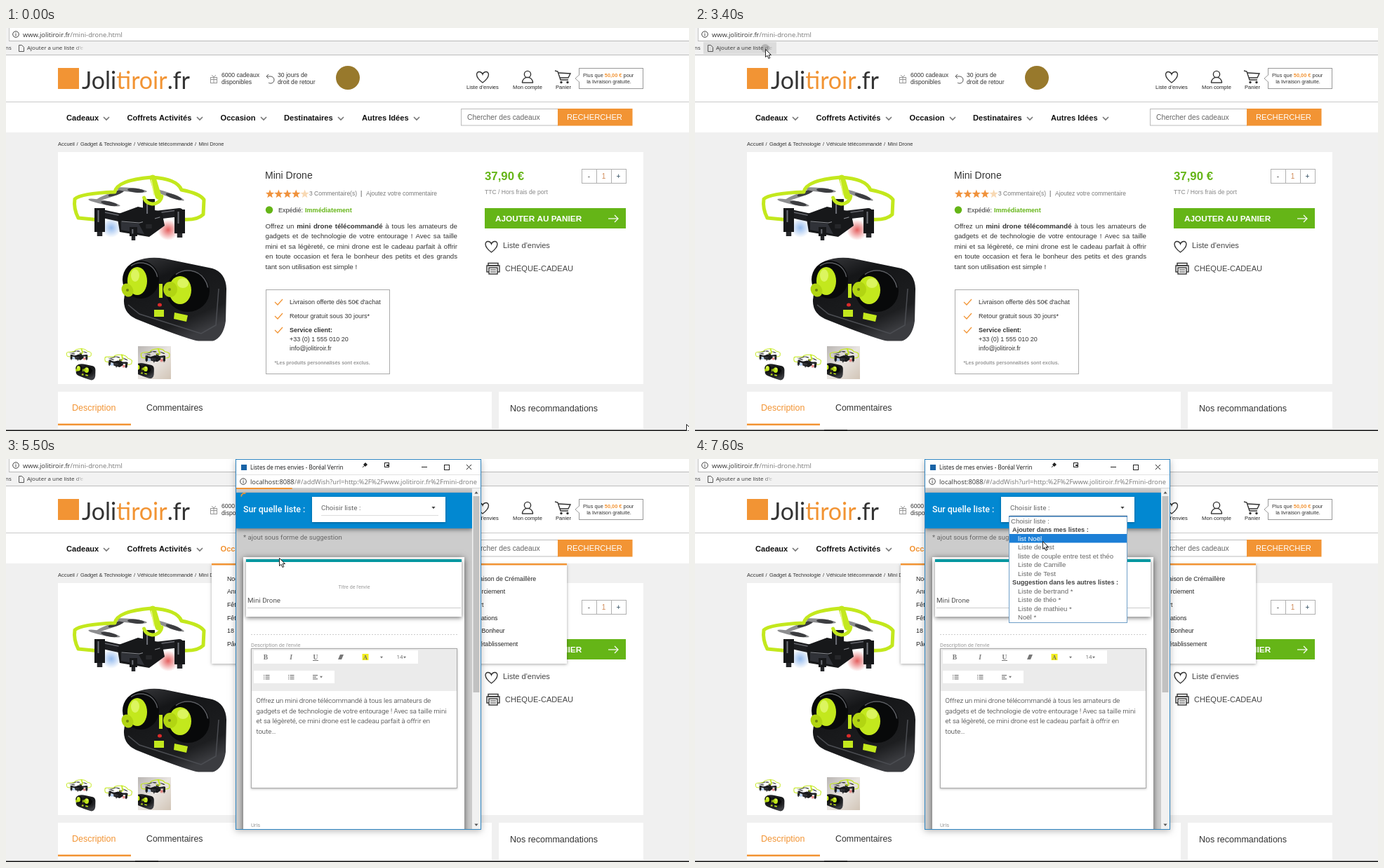
Recreate the animation shown at these times as an HTML page with a canvas. Size 973 by 575 pixels, loop 8 s.

```html
<!DOCTYPE html>
<html lang="fr">
<head>
<meta charset="utf-8">
<title>Ajout d'une envie</title>
<style>
html, body { margin: 0; width: 100%; height: 100%; overflow: hidden; background: #fff; }
canvas { display: block; }
</style>
</head>
<body>
<canvas id="stage" width="973" height="575"></canvas>
<script>
const c = document.getElementById('stage').getContext('2d');
const LOOP = 8000, STEP = 100;
const SANS = '"Liberation Sans", Arial, sans-serif';
const UI = '"Open Sans", sans-serif';
const ROBOTO = 'Roboto, sans-serif';
const SERIF = '"Liberation Serif", serif';
const ORANGE = '#f29434', GREEN = '#65b517', LIME = '#c3e81d', INK = '#333';
const SHOP = 'jolitiroir.fr', BROWSER = 'Boréal Verrin';

// --- helpers ---
function text(s, x, y, size, color = INK, weight = '', family = SANS, align = 'left') {
  c.font = `${weight} ${size}px ${family}`;
  c.fillStyle = color;
  c.textAlign = align;
  c.fillText(s, x, Math.round(y));
  return x + c.measureText(s).width;
}
function fill(x, y, w, h, color) {
  c.fillStyle = color;
  c.fillRect(x, y, w, h);
}
function frame(x, y, w, h, color) {
  c.strokeStyle = color;
  c.lineWidth = 1;
  c.strokeRect(x + .5, y + .5, w - 1, h - 1);
}
function poly(pts, close) {
  c.beginPath();
  for (let i = 0; i < pts.length; i += 2) c.lineTo(pts[i], pts[i + 1]);
  if (close) c.closePath();
}
function line(pts, color, w = 1) {
  poly(pts);
  c.strokeStyle = color;
  c.lineWidth = w;
  c.stroke();
}
function shape(pts, color) {
  poly(pts, true);
  c.fillStyle = color;
  c.fill();
}
function oval(x, y, rx, ry, color, turn = 0) {
  c.beginPath();
  c.ellipse(x, y, rx, ry, turn, 0, Math.PI * 2);
  c.fillStyle = color;
  c.fill();
}
function glow(x, y, r, rgb) {
  const g = c.createRadialGradient(x, y, 0, x, y, r);
  g.addColorStop(0, `rgba(${rgb},.85)`);
  g.addColorStop(1, `rgba(${rgb},0)`);
  oval(x, y, r, r, g);
}
function arc(x, y, r, from, to, color, w = 1) {
  c.beginPath();
  c.arc(x, y, r, from * Math.PI, to * Math.PI);
  c.strokeStyle = color;
  c.lineWidth = w;
  c.stroke();
}
function shaded(blur, dy, alpha, draw) {
  c.save();
  c.shadowColor = `rgba(0,0,0,${alpha})`;
  c.shadowBlur = blur;
  c.shadowOffsetY = dy;
  draw();
  c.restore();
}
function within(x, y, w, h, draw) {
  c.save();
  c.beginPath();
  c.rect(x, y, w, h);
  c.clip();
  draw();
  c.restore();
}
function placed(x, y, scale, draw) {
  c.save();
  c.translate(x, y);
  c.scale(scale, scale);
  draw();
  c.restore();
}
// Linear interpolation through [time, value, value...] keys.
function at(keys, t) {
  let i = 0;
  while (i < keys.length - 2 && t >= keys[i + 1][0]) i++;
  const a = keys[i], b = keys[i + 1];
  const k = Math.min(1, Math.max(0, (t - a[0]) / (b[0] - a[0])));
  return a.slice(1).map((v, j) => v + (b[j + 1] - v) * k);
}

// --- icons ---
function info(x, y) {
  arc(x, y, 4.3, 0, 2, '#444');
  fill(x - .5, y - .7, 1, 3.2, '#444');
  fill(x - .5, y - 2.6, 1, 1.1, '#444');
}
function heart(x, y) {
  c.beginPath();
  c.moveTo(x, y + 8);
  c.bezierCurveTo(x - 12, y - 1, x - 9, y - 8, x - 4.5, y - 7.5);
  c.quadraticCurveTo(x - 1, y - 7, x, y - 4);
  c.quadraticCurveTo(x + 1, y - 7, x + 4.5, y - 7.5);
  c.bezierCurveTo(x + 9, y - 8, x + 12, y - 1, x, y + 8);
  c.strokeStyle = '#333';
  c.lineWidth = 1.4;
  c.stroke();
}
function star(x, y, color) {
  const pts = [];
  for (let i = 0; i < 10; i++) {
    const r = i % 2 ? 2.7 : 6.4, a = i * Math.PI / 5 - Math.PI / 2;
    pts.push(x + r * Math.cos(a), y + r * Math.sin(a));
  }
  shape(pts, color);
}
const chevron = x => line([x - 4, 127, x, 131, x + 4, 127], '#777', 1.6);
const tick = y => line([383, y, 387, y + 4, 394, y - 4], ORANGE, 1.2);
const caret = (x, y, r, color, dir = 1) => shape([x - r, y - r * .6 * dir, x + r, y - r * .6 * dir, x, y + r * .7 * dir], color);

// --- product pictures ---
function motor(x, y, w, h) {
  fill(x, y, w, h, '#17181a');
  fill(x + w * .3, y + 3, 2, h * .5, '#6d7077');
  fill(x + w * .25, y + h, w * .5, 6, '#26272a');
}
function drone() {
  c.lineJoin = c.lineCap = 'round';
  glow(150, 285, 14, '130,175,235');
  glow(231, 288, 15, '225,70,70');
  for (const [x, y, turn] of [[140, 249, .2], [150, 238, -.35], [178, 231, .1], [232, 238, .35]]) {
    oval(x, y, 23, 3, '#8d8e90', turn);
    oval(x + 7, y + 7 * Math.tan(turn), 12, 3, '#3c3d40', turn);
  }
  c.beginPath();
  c.moveTo(134, 274);
  c.lineTo(103, 271);
  c.quadraticCurveTo(96, 258, 98, 244);
  c.quadraticCurveTo(106, 236, 155, 234);
  c.quadraticCurveTo(158, 217, 207, 213);
  c.quadraticCurveTo(244, 215, 250, 231);
  c.quadraticCurveTo(276, 236, 282, 245);
  c.lineTo(281, 266);
  c.quadraticCurveTo(272, 275, 250, 273);
  c.strokeStyle = LIME;
  c.lineWidth = 5;
  c.stroke();
  line([133, 264, 165, 271, 205, 268, 247, 263], '#1d1e21', 12);
  shape([158, 266, 188, 255, 222, 262, 226, 282, 204, 298, 162, 291], '#17181a');
  shape([164, 277, 189, 279, 197, 294, 164, 288], '#303238');
  line([165, 276, 190, 278, 219, 270], '#8b8d93', 1.2);
  line([136, 262, 160, 267], '#66686e', 1.5);
  line([222, 263, 244, 260], '#66686e', 1.5);
  motor(126, 257, 15, 34);
  motor(195, 244, 17, 36);
  motor(240, 259, 15, 34);
  motor(176, 284, 11, 13);
  line([209, 214, 217, 240], LIME, 9);
  arc(209, 238, 13, .05, .9, LIME, 5);
  line([207, 217, 211, 238], '#e8f88c', 1.5);
  c.lineJoin = 'miter';
  c.lineCap = 'butt';
}
function controller() {
  const g = c.createLinearGradient(200, 330, 250, 446);
  g.addColorStop(0, '#303134');
  g.addColorStop(.25, '#151618');
  g.addColorStop(.8, '#1d1e20');
  g.addColorStop(1, '#3b3c40');
  c.beginPath();
  c.moveTo(184, 333);
  c.quadraticCurveTo(203, 325, 226, 329);
  c.lineTo(294, 343);
  c.quadraticCurveTo(313, 349, 314, 372);
  c.lineTo(313, 418);
  c.quadraticCurveTo(309, 448, 284, 449);
  c.quadraticCurveTo(262, 446, 190, 417);
  c.quadraticCurveTo(167, 409, 168, 388);
  c.quadraticCurveTo(173, 344, 184, 333);
  c.fillStyle = g;
  c.fill();
  line([174, 395, 190, 408, 278, 436, 299, 424, 303, 372], '#4b4d52', 1.5);
  oval(192, 359, 26, 27, '#08090a');
  oval(259, 375, 31, 30, '#08090a');
  arc(192, 359, 24, 1.3, 1.95, '#5a5c61', 1.5);
  arc(259, 375, 29, 1.3, 1.95, '#5a5c61', 1.5);
  oval(187, 361, 14, 20, LIME);
  oval(184, 353, 6, 9, '#dcf55f');
  oval(173, 374, 8, 10, '#b2d512', -.5);
  oval(248, 374, 16, 20, LIME);
  oval(252, 364, 8, 7, '#dcf55f');
  oval(234, 373, 10, 11, '#b2d512');
  oval(173, 374, 2, 2, '#71870f');
  oval(233, 373, 2, 2, '#71870f');
  fill(218, 365, 5, 20, LIME);
  oval(219, 395, 3, 2.5, '#dc2a2a');
  fill(211, 402, 14, 10, LIME);
  shape([240, 406, 259, 410, 257, 419, 239, 415], LIME);
}
function pictures() {
  drone();
  within(160, 320, 160, 126.5, controller);
  placed(86 - 96 * .19, 457 - 210 * .19, .19, () => { drone(); controller(); });
  c.save();
  c.translate(160, 475);
  c.rotate(.12);
  placed(-190 * .21, -257 * .21, .21, drone);
  c.restore();
  within(188, 454, 47, 47, () => {
    const g = c.createLinearGradient(188, 454, 235, 501);
    g.addColorStop(0, '#bab6b3');
    g.addColorStop(.5, '#e9e5e1');
    g.addColorStop(1, '#d2c5b7');
    fill(188, 454, 47, 47, g);
    placed(192 - 96 * .22, 457 - 210 * .22, .22, drone);
    placed(184 - 165 * .18, 478 - 327 * .18, .18, controller);
  });
}

// --- shop page ---
function browserBars(hover) {
  fill(0, 0, 973, 39, '#f2f2f2');
  fill(4, 0, 969, 18, '#fff');
  fill(4, 18, 969, 1, '#b9b9b9');
  fill(4, 0, 1, 18, '#c4c4c4');
  fill(0, 38, 973, 1, '#bcbcbc');
  info(14, 9);
  const x = text('www.' + SHOP, 24, 12.5, 9.4, INK, '', UI);
  text('/mini-drone.html', x, 12.5, 9.4, '#777', '', UI);
  if (hover) fill(12, 20, 104, 17, '#dcdcdc');
  text('ns', -1, 31, 8, INK, '', UI);
  line([18.5, 24.5, 22.5, 24.5, 25.5, 27.5, 25.5, 33.5, 18.5, 33.5, 18.5, 24.5], '#555');
  const fade = c.createLinearGradient(97, 0, 112, 0);
  fade.addColorStop(0, INK);
  fade.addColorStop(1, 'rgba(51,51,51,0)');
  text("Ajouter a une liste d'e", 30, 31, 8, fade, '', UI);
}
function siteHeader(menuOpen) {
  fill(0, 39, 973, 110, '#fff');
  fill(0, 105, 973, 1, '#c9c9c9');
  fill(74, 57, 30, 30, ORANGE);
  let x = text('Joli', 108, 87, 34, INK, '', 'Lato, sans-serif');
  x = text('tiroir', x, 87, 34, ORANGE, '', 'Lato, sans-serif');
  text('.fr', x, 87, 34, INK, '', 'Lato, sans-serif');

  frame(291, 70, 10, 9, '#999');
  line([291, 73.5, 301, 73.5], '#999');
  line([296, 70, 296, 79], '#999');
  line([293, 67, 296, 70, 299, 67], '#999');
  text('6000 cadeaux', 307, 70, 8.6);
  text('disponibles', 307, 80, 8.6);
  line([374, 66, 371, 69, 374, 72], '#555');
  line([371, 69, 377, 69], '#555');
  arc(377, 74, 5, 1.5, 2.7, '#555');
  text('30 jours de', 387, 70, 8.6);
  text('droit de retour', 387, 80, 8.6);
  oval(487, 71, 17, 17, '#98792c');

  heart(679, 70);
  text("Liste d'envies", 679, 87, 7.6, '#222', '', SANS, 'center');
  arc(743, 66, 4.6, 0, 2, '#333', 1.4);
  arc(743, 78, 7.6, 1, 2, '#333', 1.4);
  line([735, 78, 751, 78], '#333', 1.4);
  text('Mon compte', 743, 87, 7.6, '#222', '', SANS, 'center');
  line([782, 61, 786, 62, 790, 74, 801, 74], '#333', 1.4);
  line([787, 64, 804, 65, 801, 71, 789, 71], '#333', 1.4);
  oval(791, 77.5, 1.7, 1.7, '#333');
  oval(800, 77.5, 1.7, 1.7, '#333');
  text('Panier', 794, 87, 7.6, '#222', '', SANS, 'center');
  frame(816, 57, 92, 30, '#999');
  shape([817, 67, 811, 72, 817, 77], '#fff');
  line([816.5, 67, 811, 72, 816.5, 77], '#999');
  x = text('Plus que ', 822, 70, 7.4);
  x = text('50,00 €', x, 70, 7.4, ORANGE, 'bold');
  text(' pour', x, 70, 7.4);
  text('la livraison gratuite.', 859, 79, 7.4, INK, '', SANS, 'center');

  const nav = [['Cadeaux', 86, 143], ['Coffrets Activités', 172.5, 276], ['Occasion', 305.5, 367],
    ['Destinataires', 396, 477], ['Autres Idées', 507, 585]];
  for (const [name, left, arrow] of nav) {
    text(name, left, 132, 11.1, menuOpen && name === 'Occasion' ? ORANGE : '#111', 'bold');
    chevron(arrow);
  }
  frame(648, 115, 139, 24.5, '#bbb');
  text('Chercher des cadeaux', 657, 131, 10.3, '#666');
  fill(786, 115, 106.5, 24.5, ORANGE);
  text('RECHERCHER', 799, 131, 11.2, '#fff');
}
// Words marked with _ are bold; spaces stretch to reach the full width.
function justified(s, x, y, width, size) {
  const words = s.split(' ').map(w => [w.replace('_', ''), w[0] === '_' ? 'bold' : '']);
  let used = 0;
  for (const [w, weight] of words) {
    c.font = `${weight} ${size}px ${SANS}`;
    used += c.measureText(w).width;
  }
  const gap = (width - used) / (words.length - 1);
  for (const [w, weight] of words) x = text(w, x, y, size, INK, weight) + gap;
}
function productInfo() {
  text('Mini Drone', 369, 215, 14);
  for (let i = 0; i < 5; i++) star(376 + i * 12.4, 237, i < 4 ? '#f0923c' : '#f8d9b4');
  text('3 Commentaire(s)', 432, 239, 8.5, '#777');
  text('|', 505, 239, 8.5);
  text('Ajoutez votre commentaire', 513, 239, 8.5, '#777');
  oval(375, 259.5, 5.2, 5.2, GREEN);
  text('Expédié:', 388, 263, 9);
  text('Immédiatement', 426, 263, 9.1, GREEN, 'bold');
  ['Offrez un _mini _drone _télécommandé à tous les amateurs de',
    'gadgets et de technologie de votre entourage ! Avec sa taille',
    'mini et sa légèreté, ce mini drone est le cadeau parfait à offrir',
    'en toute occasion et fera le bonheur des petits et des grands',
  ].forEach((s, i) => justified(s, 369.5, 285.5 + i * 14.6, 273.5, 9.7));
  text('tant son utilisation est simple !', 369.5, 344, 9.8);

  frame(370, 373, 177, 121, '#aaa');
  [391, 411, 431].forEach(tick);
  text("Livraison offerte dès 50€ d'achat", 404, 394, 9);
  text('Retour gratuit sous 30 jours*', 404, 414, 9);
  text('Service client:', 404, 434, 9, INK, 'bold');
  text('+33 (0) 1 555 010 20', 404, 447, 9);
  text('info@' + SHOP, 404, 460, 9);
  text('*Les produits personnalisés sont exclus.', 382.5, 480, 7, '#999', 'bold');
}
function buyBox() {
  text('37,90 €', 682, 217, 16.8, GREEN, 'bold');
  [['-', 820, '#444'], ['1', 841, '#d08a58'], ['+', 862, '#2d4a5e']].forEach(([s, x, color]) => {
    frame(x, 201, 22, 21, '#b0b0b0');
    text(s, x + 10.5, 215, 10, color, '', SANS, 'center');
  });
  text('TTC / Hors frais de port', 682, 237, 8.6, '#888');
  fill(682, 257, 201, 29, GREEN);
  text('AJOUTER AU PANIER', 697, 276, 11.75, '#fff', 'bold');
  line([858, 272, 872, 272], '#fff', 1.2);
  line([867, 267, 872, 272, 867, 277], '#fff', 1.2);
  heart(691.5, 312);
  text("Liste d'envies", 708, 314, 11.1, '#444');
  c.strokeStyle = '#333';
  c.lineWidth = 1.4;
  c.strokeRect(685, 339, 18, 9);
  fill(688, 342, 12, 9, '#fff');
  c.strokeRect(688, 342, 12, 9);
  c.strokeRect(687, 335.5, 14, 3.5);
  line([690, 345, 698, 345], '#333');
  line([690, 348, 698, 348], '#333');
  text('CHÉQUE-CADEAU', 711, 347, 11.05, '#444');
}
function page(hover, menuOpen) {
  fill(0, 0, 973, 575, '#f0f0f0');
  browserBars(hover);
  siteHeader(menuOpen);
  [['Accueil', 74], ['/', 100.5], ['Gadget & Technologie', 106], ['/', 182], ['Véhicule télécommandé', 187],
    ['/', 269], ['Mini Drone', 274.5]].forEach(([s, x]) => text(s, x, 168, 7.45));
  fill(74, 177, 834, 331, '#fff');
  pictures();
  productInfo();
  buyBox();
  fill(74, 519, 618, 53, '#fff');
  fill(702, 519, 206, 53, '#fff');
  text('Description', 94, 546, 12.5, ORANGE);
  text('Commentaires', 200, 546, 12.4);
  text('Nos recommandations', 718, 547, 12.5);
  fill(74, 564.5, 104, 2.5, ORANGE);
}
function occasionMenu() {
  shaded(4, 1, .35, () => fill(293, 150, 506, 142, '#fff'));
  fill(293, 149, 506, 2.5, ORANGE);
  const left = ['Noël', 'Anniversaire', 'Fête des mères', 'Fête des pères', '18 ans', 'Pâques'];
  const right = ['Pendaison de Crémaillère', 'Remerciement', 'Départ', 'Félicitations', 'Porte Bonheur', 'Bon rétablissement'];
  left.forEach((s, i) => text(s, 315, 173.5 + i * 18.7, 8.8, '#222'));
  right.forEach((s, i) => text(s, 654, 173.5 + i * 18.7, 8.8, '#222'));
}

// --- popup window ---
function popupFrame(loaded) {
  shaded(9, 2, .28, () => fill(327, 0, 350, 529, '#fff'));
  if (loaded) {
    fill(335, 8, 8, 8, '#1763a6');
    shape([509, 8, 512, 5, 515, 8, 512, 11], '#222');
    line([508, 12, 511, 9], '#222');
    frame(539, 5, 7, 7, '#222');
    fill(542, 8, 3, 2, '#222');
  } else {
    arc(338, 12, 4, .4, 1, '#c3d3e6', 1.3);
  }
  text((loaded ? 'Listes de mes envies - ' : 'Loading ... - ') + BROWSER, 348, 15, 8.05, '#111', '', UI);
  line([592, 11.5, 600, 11.5], '#222');
  frame(624, 8, 8, 8, '#222');
  line([656, 8, 663, 15], '#222');
  line([663, 8, 656, 15], '#222');
  fill(328, 22, 348, 1, '#e2e2e2');
  info(338, 32);
  within(328, 23, 343, 18, () => {
    const x = text('localhost:8088', 348, 35.5, 9.3, INK, '', UI);
    const rest = loaded ? `/#/addWish?url=http:%2F%2Fwww.${SHOP}%2Fmini-drone.html`
      : `/#/addWish/?url=http%3A%2F%2Fwww.${SHOP}%2Fmini-drone.html`;
    text(rest, x, 35.5, 9.3, '#777', '', UI);
  });
  fill(328, 41, 348, 1, '#d5d5d5');
}
function waitingBubble() {
  fill(328, 513, 115, 15, '#f2f2f2');
  line([328, 513.5, 441, 513.5, 442.5, 515, 442.5, 528], '#bbb');
  text("En attente de l'affichage du c...", 330, 523.5, 7.9, '#555', '', UI);
}
function toolbar() {
  fill(350, 271, 292, 60, '#ebebeb');
  fill(353, 273, 234, 19, '#fff');
  fill(353, 302, 115, 18, '#fff');
  const grey = '#777';
  text('B', 370, 286, 9.5, grey, 'bold', SERIF, 'center');
  text('I', 406, 286, 9.5, grey, 'italic bold', SERIF, 'center');
  text('U', 441, 286, 9.5, grey, 'bold', SERIF, 'center');
  line([437, 287.5, 445, 287.5], grey);
  shape([476, 279, 481, 279, 478, 286, 473, 286], grey);
  fill(507.5, 278, 9, 9, '#f3ee1f');
  text('A', 512, 286, 8, '#666', 'bold', SERIF, 'center');
  caret(535, 283, 2, grey);
  text('14', 556.5, 285, 8, grey, '', ROBOTO);
  caret(568, 283, 2, grey);
  for (let i = 0; i < 3; i++) {
    const y = 308 + i * 2.6;
    for (const x of [367, 402]) {
      fill(x, y, 1.2, 1.2, grey);
      fill(x + 2.5, y, 6, 1.2, grey);
    }
    fill(437, y, i === 1 ? 5 : 7, 1.2, grey);
  }
  caret(449, 311, 2, grey);
}
function form() {
  shaded(6, 2, .45, () => fill(328, 48, 336, 51, '#0288d1'));
  text('Sur quelle liste :', 338, 76, 12.4, '#fff', '500', ROBOTO);
  shaded(3, 1, .3, () => fill(436, 54, 190, 36, '#fff'));
  text('Choisir liste :', 449, 73, 9.9, '#666', '', ROBOTO);
  caret(609, 69.5, 2.6, '#444');
  fill(449, 80, 167, 1, '#ddd');
  text('* ajout sous forme de suggestion', 338, 115, 9.55, '#666', '', ROBOTO);
  shaded(9, 2, .6, () => fill(338, 140, 315, 400, '#fff'));
  shaded(6, 2, .5, () => fill(342, 143, 307, 82, '#fff'));
  fill(342, 143, 307, 4, '#0097a0');
  text("Titre de l'envie", 496, 185, 7.1, '#999', '', ROBOTO, 'center');
  text('Mini Drone', 344, 205, 9.8, '#555', '', ROBOTO);
  fill(344, 212, 304, 1, '#ccc');
  for (let x = 349; x < 643; x += 4) fill(x, 250, 2, 1, '#ccc');
  text("Description de l'envie", 349, 268, 7.5, '#999', '', ROBOTO);
  shaded(3, 1, .25, () => fill(349, 270, 294, 200, '#fff'));
  toolbar();
  frame(349, 270, 294, 200, '#aaa');
  ['Offrez un mini drone télécommandé à tous les amateurs de',
    'gadgets et de technologie de votre entourage ! Avec sa taille mini',
    'et sa légèreté, ce mini drone est le cadeau parfait à offrir en',
    'toute…'].forEach((s, i) => text(s, 356.5, 348 + i * 14.5, 9.6, '#222', '300', ROBOTO));
  text('Urls', 349, 525, 7.5, '#999', '', ROBOTO);
  fill(664, 42, 12, 486, '#f1f1f1');
  fill(665.5, 53, 9, 280, '#c1c1c1');
  caret(670, 48, 2.6, '#555', -1);
  caret(670, 522, 2.6, '#555');
}
const OPTIONS = ['Choisir liste :', '#Ajouter dans mes listes :', 'list Noël', 'Liste de test',
  'liste de couple entre test et théo', 'Liste de Camille', 'Liste de Test', '#Suggestion dans les autres listes :',
  'Liste de bertrand *', 'Liste de théo *', 'Liste de mathieu *', 'Noël *'];
function optionList(cursorY) {
  const row = 12.5;
  let hot = Math.max(0, Math.floor((cursorY - 82) / row));
  if (OPTIONS[hot][0] === '#') hot--;
  fill(447, 81, 169, 152, '#fff');
  OPTIONS.forEach((s, i) => {
    const y = 82 + i * row, group = s[0] === '#';
    if (i === hot) fill(448, y, 167, row, '#1c7fd6');
    if (group) text(s.slice(1), 452, y + 9.7, 9.2, '#444', 'bold');
    else text(s, i ? 460 : 450, y + 9.7, 9.6, i === hot ? '#fff' : '#666');
  });
  frame(447, 81, 169, 153, '#6f9fc8');
  fill(447, 81, 169, 1.5, '#2b6fae');
}
const PROGRESS = [[4600, 0], [4700, 7], [5900, 116], [6100, 180], [6400, 336]];
function popup(t, pointer) {
  popupFrame(t >= 4400);
  within(328, 42, 348, 486, () => {
    if (t >= 4500) fill(328, 42, 348, 486, '#cccccc');
    if (t >= 5300) form();
    else waitingBubble();
  });
  if (t >= 4600 && t < 6500) {
    fill(328, 41, at(PROGRESS, t)[0], 2, ORANGE);
    const turn = (t - 4700) / 400 * 2;
    arc(339.5, 53, 4.2, .95 + turn, 1.65 + turn, ORANGE, 1.8);
  }
  if (t >= 7000) optionList(pointer[1]);
  frame(327, 0, 350, 529, '#2f86c2');
}

// --- pointer ---
const PATH = [[0, 969, 565], [100, 969, 565], [900, 286, 78], [1200, 196, 29], [1500, 120, 29], [1900, 104, 34],
  [2200, 118, 62], [2700, 100, 30], [4100, 100, 30], [4700, 162, 61], [4950, 318, 126], [5150, 345, 140],
  [5900, 440, 143], [6000, 440, 143], [6700, 622, 63], [7000, 622, 63], [7600, 495, 117]];
function outlined(pts) {
  shape(pts, '#fff');
  poly(pts, true);
  c.strokeStyle = '#222';
  c.lineWidth = 1;
  c.stroke();
}
function drawPointer([x, y]) {
  const link = x > 73 && x < 268 && y > 54 && y < 90;
  c.save();
  c.translate(Math.round(x) + .5, Math.round(y) + .5);
  if (link) outlined([0, 0, 2, 0, 2, 5, 7, 6, 8, 8, 7, 14, 0, 14, -4, 8, -3, 7, 0, 9]);
  else outlined([0, 0, 0, 11, 2.6, 8.8, 4.4, 13, 6.3, 12.2, 4.6, 8, 8, 8]);
  c.restore();
}

// --- timeline ---
function draw(t) {
  const pointer = at(PATH, t), menuOpen = t >= 4900;
  page(t >= 3400 && t < 4200, menuOpen);
  if (t >= 2000 && t < 2800) {
    fill(0, 563, 310, 11, '#f2f2f2');
    line([0, 563.5, 308, 563.5, 309.5, 565, 309.5, 574], '#bbb');
    text('www.' + SHOP, 3, 574, 8, '#666', '', UI);
  }
  if (menuOpen) occasionMenu();
  if (t >= 3700) popup(t, pointer);
  fill(0, 573.5, 973, 1.5, '#111');
  if (t >= 2000) fill(184, 573, 33, 1, '#444');
  if (t >= 3400 && t < 3700) oval(100, 29, 6, 6, `rgba(120,120,120,${.4 * (3700 - t) / 300})`);
  drawPointer(pointer);
}
const start = performance.now();
let shown = -1;
function loop(now) {
  const t = Math.floor(Math.max(0, now - start) % LOOP / STEP) * STEP;
  if (t !== shown) draw(shown = t);
  requestAnimationFrame(loop);
}
draw(shown = 0);
requestAnimationFrame(loop);
</script>
</body>
</html>
```
